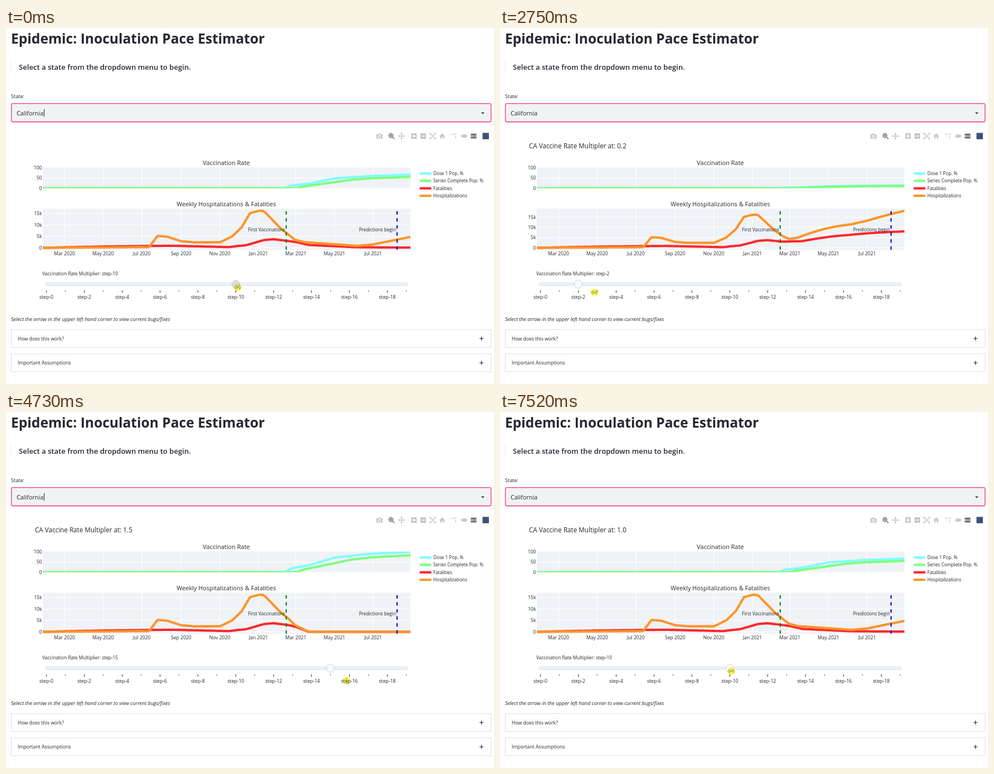
These frames come from a looping animation (876x639 px, 7650 ms). An HTML page:

```html
<!DOCTYPE html>
<html lang="en">
<head>
<meta charset="utf-8">
<title>Rate simulator</title>
<style>
html, body { margin: 0; width: 100%; height: 100%; overflow: hidden; background: #fff; }
svg { display: block; font-family: "Open Sans", "Noto Sans", sans-serif; }
text { fill: #262730; white-space: pre; }
</style>
</head>
<body>
<svg id="stage" width="876" height="639" viewBox="0 0 876 639"></svg>
<script>
const LOOP = 7650, LAG = 150;
const LEFT = 66, RIGHT = 726, ZERO = 394.5, FIRST_DOSE = 503;
const stage = document.getElementById('stage');

function add(tag, attrs, parent = stage) {
  const el = document.createElementNS('http://www.w3.org/2000/svg', tag);
  for (const k in attrs) el.setAttribute(k, attrs[k]);
  parent.appendChild(el);
  return el;
}
function label(x, y, size, str, attrs = {}, parent = stage) {
  const el = add('text', { x, y, 'font-size': size, ...attrs }, parent);
  el.textContent = str;
  return el;
}
const rect = (x, y, width, height, attrs, parent) => add('rect', { x, y, width, height, ...attrs }, parent);
const path = (d, attrs, parent) => add('path', { d, fill: 'none', ...attrs }, parent);
const show = (el, on) => el.setAttribute('visibility', on ? 'visible' : 'hidden');
const MID = { 'text-anchor': 'middle' }, END = { 'text-anchor': 'end' };

// Page header and state picker
label(9, 28, 24.6, 'Epidemic: Inoculation Pace Estimator', { 'font-weight': 700 });
rect(8.5, 56, 1.3, 25, { fill: '#f0f2f6' });
label(23, 74.6, 13.1, 'Select a state from the dropdown menu to begin.', { 'font-weight': 600 });
label(9, 126, 9.1, 'State:');
rect(9.7, 135.7, 861, 32.8, { rx: 2.5, fill: '#f0f2f6', stroke: '#f63366', 'stroke-width': 1.3 });
label(19, 156.8, 10.8, 'California');
const caret = rect(68, 145.5, 1, 14, { fill: '#262730' });
path('M852.8 151.4h6l-3 3.2z', { fill: '#262730' });

// Chart toolbar
const LIGHT = '#c6c7ca', DARK = '#77787c';
function icon(x, d, color, solid) {
  const paint = solid ? { fill: color, 'fill-rule': 'evenodd' } : { stroke: color, 'stroke-width': 1.6 };
  path(d, { transform: `translate(${x} 194)`, ...paint });
}
icon(670.5, 'M-5.5 -3h3l1-1.6h3l1 1.6h3v7.4h-11zM0 -2a2.7 2.7 0 1 0 .01 0zM0 -.7a1.4 1.4 0 1 1 -.01 0z', LIGHT, true);
icon(692, 'M-1 -4.4a3.5 3.5 0 1 0 .01 0zM1.6 1.8L5.3 5.2M-2.8 -.9h3.6M-1 -2.7v3.6', DARK);
icon(710, 'M-5 0h10M0 -5v10M-3.6 -1.5l-1.6 1.5 1.6 1.5M3.6 -1.5l1.6 1.5 -1.6 1.5M-1.5 -3.6l1.5 -1.6 1.5 1.6M-1.5 3.6l1.5 1.6 1.5 -1.6', LIGHT);
icon(732.3, 'M-5 -5h10v10h-10zM-.8 -3v2.2h-2.2v1.6h2.2v2.2h1.6v-2.2h2.2v-1.6h-2.2v-2.2z', LIGHT, true);
icon(749, 'M-5 -5h10v10h-10zM-3 -.8v1.6h6v-1.6z', LIGHT, true);
icon(766, 'M-5 -2.5v-2.5h2.5M2.5 -5h2.5v2.5M5 2.5v2.5h-2.5M-2.5 5h-2.5v-2.5M-3.2 -3.2l6.4 6.4M3.2 -3.2l-6.4 6.4', LIGHT);
icon(783, 'M0 -4.8L5.3 .2h-1.5v4.3h-2.6v-3h-2.4v3h-2.6v-4.3h-1.5z', LIGHT, true);
icon(804, 'M-5 -3.4h1.8M-1.8 -3.4h1.8M3 4.6v-1.8M3 1.4v-1.8M1.2 -3.4h3.4', LIGHT);
icon(822, 'M-5.5 0l3 -2.7h8v5.4h-8z', LIGHT, true);
icon(839, 'M-5.5 -2.5l1.7 -2h9.3v4h-9.3zM-5.5 2.5l1.7 -2h9.3v4h-9.3z', DARK, true);
rect(855.4, 188.3, 11.4, 11.4, { fill: '#3f4f75' });

// Every second month from March 2020, placed by its date
const DAY = 864e5, START = Date.UTC(2020, 2, 1);
const months = Array.from({ length: 9 }, (_, i) => {
  const date = new Date(Date.UTC(2020, 2 + 2 * i, 1));
  const name = date.toLocaleString('en-US', { month: 'short', timeZone: 'UTC' });
  return { x: 105 + (date - START) / DAY * 1.1376, str: `${name} ${date.getUTCFullYear()}` };
});

// Charts
const clips = add('defs', {});
function plot(id, y, h) {
  rect(LEFT, y, RIGHT - LEFT, h, {}, add('clipPath', { id }, clips));
  rect(LEFT, y, RIGHT - LEFT, h, { fill: '#eff2f6' });
  for (const { x } of months) rect(x - .6, y, 1.2, h, { fill: '#fff' });
}
const gridLine = (y, parent) => rect(LEFT, y - .6, RIGHT - LEFT, 1.2, { fill: '#fff' }, parent);
plot('top', 250.5, 37);
plot('low', 324.5, 73.5);
gridLine(269.2);
const grid = add('g', {});

const series = [
  ['Dose 1 Pop. %', '#80fdff', 'top'],
  ['Series Complete Pop. %', '#80fd80', 'top'],
  ['Fatalities', '#ff282c', 'low'],
  ['Hospitalizations', '#ff9429', 'low']
];
const lines = series.map(([str, stroke, id], i) => {
  const y = 261 + i * 13.4;
  path(`M742.5 ${y}h21`, { stroke, 'stroke-width': 4.2 });
  label(767, y + 3, 8.2, str);
  return path('', { stroke, 'stroke-width': 4.2, 'stroke-linejoin': 'round', 'clip-path': `url(#${id})` });
});
function marker(x, stroke, str) {
  path(`M${x} 328.7V398`, { stroke, 'stroke-width': 2, 'stroke-dasharray': '6.3 6.3' });
  label(x - 2, 365, 8.25, str, END);
}
marker(FIRST_DOSE, '#008000', 'First Vaccinations');
marker(702, '#0505d0', 'Predictions begin');

const title = label(52, 215.6, 11.7, '');
label(395.5, 246.2, 11, 'Vaccination Rate', MID);
label(395.5, 319.8, 10.9, 'Weekly Hospitalizations & Fatalities', MID);
[100, 50, 0].forEach((v, i) => label(64.5, 254 + i * 18.3, 8.6, v, END));
for (const { x, str } of months) label(x, 408, 8.6, str, MID);

// Key points at multiplier 1: x, then percent or thousands
const DOSE = [[501, 0], [511, 12], [545, 23], [591, 48], [657, 60], [726, 66]];
const FULL = [[521, 0], [534, 8.5], [622, 41.5], [657, 48.5], [726, 55]];
const DEATHS = [[66, 0], [175, .55], [296, .9], [400, .3], [432, 1.2], [463, 3.4], [480, 3.75],
  [503, 3.1], [521, 2.5], [543, 1.25], [628, .25], [726, .07]];
const HOSP = [[66, 0], [257, .3], [272, 5.2], [289, 4.9], [314, 2.9], [338, 2.4], [384, 2.4], [406, 5],
  [423, 9], [438, 15.2], [455, 16.3], [463, 16.1], [494, 8.3], [519, 3.45], [535, 2.5], [631, .85], [659, 1.47], [726, 4.78]];

function at(pts, x) {
  const i = pts.findIndex(p => p[0] >= x);
  if (i < 1) return 0;
  const [x0, y0] = pts[i - 1], [x1, y1] = pts[i];
  return y0 + (y1 - y0) * (x - x0) / (x1 - x0);
}
// Saturating growth of the extra cases when fewer doses are given
function rise(x, top, half, power) {
  const r = (Math.max(0, x - FIRST_DOSE) / half) ** power;
  return top * r / (1 + r);
}
const sample = f => Array.from({ length: 331 }, (_, i) => [LEFT + 2 * i, f(LEFT + 2 * i)]);
const trace = (pts, fy) => 'M' + pts.map(([x, v]) => `${x} ${fy(v).toFixed(2)}`).join('L');

// Slider
const stepX = s => 72.5 + 34 * s;
const stepLabel = label(65, 444.3, 8.3, '');
rect(70.5, 458, 650, 3.8, { rx: 1.9, fill: '#f8fafc', stroke: '#bec8d9', 'stroke-width': .8 });
for (let s = 0; s < 20; s++) {
  const even = s % 2 === 0;
  rect(stepX(s) - .5, 470.8, 1, even ? 4.4 : 2, { fill: '#333' });
  if (even) label(stepX(s), 486.4, 8.7, 'step-' + s, MID);
}
const knob = add('circle', { cy: 460, r: 7.2, stroke: '#bec8d9', 'stroke-width': .8 });

// Notes
label(9, 525.6, 9.1, 'Select the arrow in the upper left hand corner to view current bugs/fixes', { 'font-style': 'italic' });
['How does this work?', 'Important Assumptions'].forEach((str, i) => {
  const y = 541.5 + 43.5 * i;
  rect(9.5, y, 861.5, 32, { fill: '#fff', stroke: '#dcdde1', 'stroke-width': 1 });
  label(21, y + 19.3, 8.67, str);
  path(`M850 ${y + 16}h7M853.5 ${y + 12.5}v7`, { stroke: '#262730', 'stroke-width': 1.2 });
});

// Pointer
const pointer = add('g', {});
add('circle', { r: 6.8, fill: '#faf445', opacity: .85, style: 'mix-blend-mode:multiply' }, pointer);
const shapes = {
  resize: path('M-6 0l3 -2.8v2h6v-2l3 2.8 -3 2.8v-2h-6v2z', { fill: '#fff870', stroke: '#85802f', 'stroke-width': .7 }, pointer),
  beam: path('M-1.6 -4.5h3.2M0 -4.5v9M-1.6 4.5h3.2', { stroke: '#aaa634', 'stroke-width': .8 }, pointer),
  arrow: path('M-.8 -1v9.4l2.2 -2 1.5 3.4 1.5 -.7 -1.5 -3.3h3z', { fill: '#fff', stroke: '#333', 'stroke-width': .8 }, pointer)
};
// Three sweeps along the slider, with rests between them
const SWEEPS = [
  { from: 30, to: 2100, x: [416, 73], y: [466, 466], bow: 0, ease: p => p ** 1.15 },
  { from: 2370, to: 5460, x: [73, 723], y: [466, 468], bow: 22, ease: p => 1 - (1 - p) ** 1.22 },
  { from: 5700, to: 7480, x: [723.5, 415], y: [468, 465], bow: -9, ease: p => 1 - (1 - p) ** 1.15 }
];
const mix = ([a, b], p) => a + (b - a) * p;

function pointerAt(t) {
  const s = SWEEPS.findLast(k => t >= k.from) || SWEEPS[0];
  const p = Math.max(0, Math.min(1, (t - s.from) / (s.to - s.from)));
  return [mix(s.x, s.ease(p)), mix(s.y, p) + s.bow * Math.sin(Math.PI * p)];
}

let shown = -1;
function drawStep(step) {
  if (step === shown) return;
  shown = step;
  const m = step / 10;
  const hosp = sample(x => Math.max(0, at(HOSP, x) + (1 - m) * rise(x, 20, 85, 1.7)));
  const deaths = sample(x => Math.max(0, at(DEATHS, x) + (1 - m) * rise(x, 12.5, 95, 1.6)));
  const scale = 66.5 / Math.max(...hosp.map(p => p[1]));
  const pct = v => 287.5 - Math.min(100, v * m) * .367;
  const thousands = v => ZERO - v * scale;
  const paths = [
    trace(sample(x => at(DOSE, x)), pct), trace(sample(x => at(FULL, x)), pct),
    trace(deaths, thousands), trace(hosp, thousands)
  ];
  lines.forEach((line, i) => line.setAttribute('d', paths[i]));

  grid.replaceChildren();
  const gap = 73.5 / scale > 25 ? 10 : 5;
  for (let v = 0; thousands(v) > 325; v += gap) {
    gridLine(thousands(v), grid);
    label(64.5, thousands(v) + 3.1, 8.6, v ? v + 'k' : '0', END, grid);
  }
  knob.setAttribute('cx', stepX(step));
  stepLabel.textContent = 'Vaccination Rate Multiplier: step-' + step;
  title.textContent = 'CA Vaccine Rate Multipler at: ' + m.toFixed(1);
}

function draw(t) {
  const [x, y] = pointerAt(t);
  const step = Math.round((pointerAt(t - LAG)[0] - stepX(0)) / 34);
  drawStep(step);
  const held = step === 10 && t < 1000;
  show(title, !held);
  knob.setAttribute('fill', held ? '#d9dde3' : '#f8fafc');
  show(caret, (t + 100) % 1100 < 550);
  pointer.setAttribute('transform', `translate(${x.toFixed(2)} ${y.toFixed(2)})`);
  const kind = y < 475 ? 'resize' : y < 484 ? 'beam' : 'arrow';
  for (const k in shapes) show(shapes[k], k === kind);
}

function tick() {
  draw(performance.now() % LOOP);
  requestAnimationFrame(tick);
}
tick();
</script>
</body>
</html>
```
